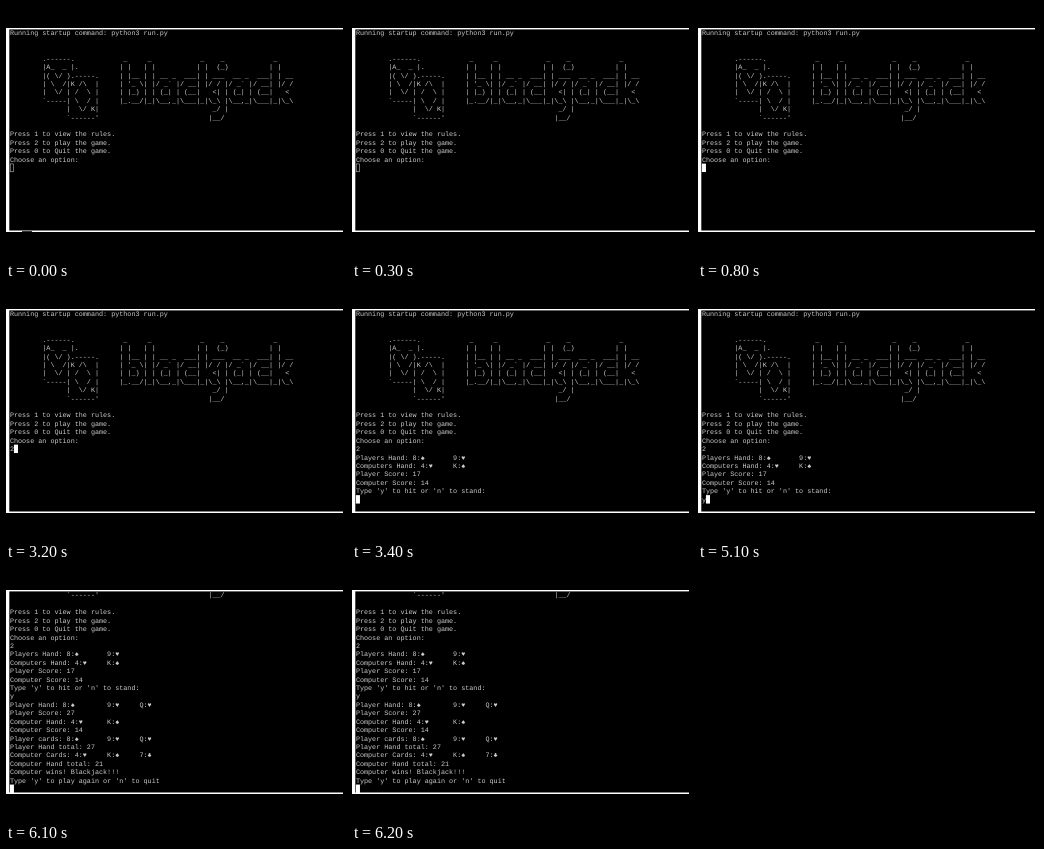
Animation, 340 px wide and 253 px high, one loop 8 s. Source, as an HTML page with a canvas:

```html
<!DOCTYPE html>
<html lang="en">
<head>
<meta charset="utf-8">
<title>Blackjack terminal</title>
<style>
  html, body { margin: 0; width: 100%; height: 100%; overflow: hidden; background: #000; }
  canvas { display: block; }
</style>
</head>
<body>
<canvas id="stage" width="340" height="253"></canvas>
<pre id="log" hidden>
Running startup command: python3 run.py


        .------.            _     _            _    _            _
        |A_  _ |.          | |   | |          | |  (_)          | |
        |( \/ ).-----.     | |__ | | __ _  ___| | ___  __ _  ___| | __
        | \  /|K /\  |     | '_ \| |/ _` |/ __| |/ / |/ _` |/ __| |/ /
        |  \/ | /  \ |     | |_) | | (_| | (__|   &lt;| | (_| | (__|   &lt;
        `-----| \  / |     |_.__/|_|\__,_|\___|_|\_\ |\__,_|\___|_|\_\
              |  \/ K|                            _/ |
              `------'                           |__/

Press 1 to view the rules.
Press 2 to play the game.
Press 0 to Quit the game.
Choose an option:
2
Players Hand: 8:♠       9:♥
Computers Hand: 4:♥     K:♠
Player Score: 17
Computer Score: 14
Type 'y' to hit or 'n' to stand:
y
Player Hand: 8:♠        9:♥     Q:♥
Player Score: 27
Computer Hand: 4:♥      K:♠
Computer Score: 14
Player cards: 8:♠       9:♥     Q:♥
Player Hand total: 27
Computer Cards: 4:♥     K:♠     7:♣
Computer Hand total: 21
Computer wins! Blackjack!!!
Type 'y' to play again or 'n' to quit
</pre>
<script>
const ctx = document.getElementById('stage').getContext('2d');
const lines = document.getElementById('log').textContent.split('\n');

const LOOP = 8000, ROWS = 24;
const LEFT = 3.9, TOP = 22.9, CELL_W = 4.05, CELL_H = 8.42, BASELINE = 6.5;

// Everything before the cursor has been printed.
const steps = [
  { at: 0, row: 16, col: 0, hollow: true },
  { at: 800, row: 16, col: 0 },
  { at: 3200, row: 16, col: 1 },
  { at: 3400, row: 22, col: 0 },
  { at: 5100, row: 22, col: 1 },
  { at: 6100, row: 33, col: 0 }
];

function rect(color, x, y, w, h) {
  ctx.fillStyle = color;
  ctx.fillRect(x, y, w, h);
}

function drawLine(text, row) {
  ctx.fillStyle = '#ccc';
  [...text].forEach((char, col) => {
    if (char !== ' ') ctx.fillText(char, LEFT + col * CELL_W, TOP + row * CELL_H + BASELINE);
  });
}

function drawCursor(row, col, hollow) {
  const x = LEFT + col * CELL_W, y = TOP + row * CELL_H;
  if (hollow) {
    ctx.strokeStyle = '#bbb';
    ctx.lineWidth = 0.6;
    ctx.strokeRect(x + 0.3, y + 0.3, CELL_W - 0.6, CELL_H - 0.6);
  } else {
    rect('#fff', x, y, CELL_W, CELL_H);
  }
}

function drawFrame(time) {
  rect('#fff', 0, 22, 337, 1.4);
  rect('#fff', 0, 224.5, 337, 1.5);
  rect('#fff', 0, 22, 3.3, 204);
  if (time < 300) rect('#333', 16, 225, 10, 1);
}

function draw(time) {
  const { row, col, hollow } = steps.findLast(step => step.at <= time);
  const scroll = Math.max(0, row - ROWS + 1);

  rect('#000', 0, 0, 340, 253);
  ctx.font = '6.75px "Liberation Mono", monospace';
  ctx.textRendering = 'geometricPrecision';
  for (let i = scroll; i < row; i++) drawLine(lines[i], i - scroll);
  drawLine((lines[row] || '').slice(0, col), row - scroll);
  drawCursor(row - scroll, col, hollow);
  drawFrame(time);
}

const start = performance.now();
function tick() {
  draw((performance.now() - start) % LOOP);
  requestAnimationFrame(tick);
}
tick();
</script>
</body>
</html>
```
